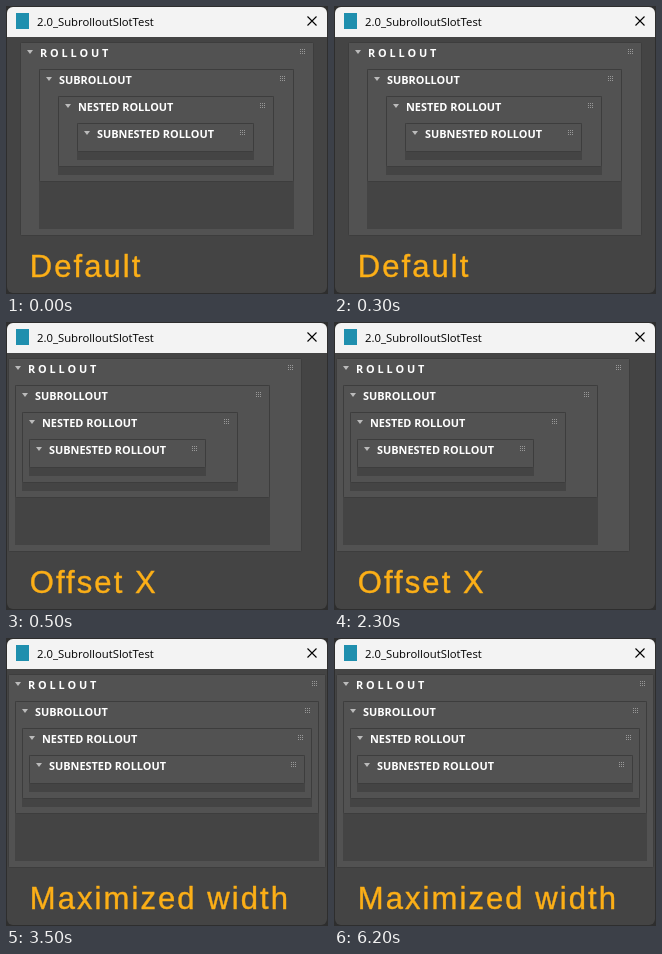
Recreate the animation shown at these times as an HTML page. Size 322 by 288 pixels, loop 8 s.

```html
<!DOCTYPE html>
<html lang="en">
<head>
<meta charset="utf-8">
<title>Rollout layout</title>
<style>
  html, body { margin: 0; width: 100%; height: 100%; overflow: hidden; background: #444; }
  svg { display: block; width: 322px; height: 288px; }
  .title { font: 11.3px "Open Sans", sans-serif; fill: #000; }
  .label { font: bold 10.9px "Open Sans", sans-serif; fill: #fff; white-space: pre; }
  .caption {
    font: 31px "Liberation Sans", Arial, sans-serif; letter-spacing: 2.07px;
    fill: #fcaf17; stroke: #fcaf17; stroke-width: .4px;
  }
</style>
</head>
<body>
<svg viewBox="0 0 322 288">
  <rect width="322" height="288" fill="#2e2e2e"/>
  <rect x="1" y="1" width="320" height="286" rx="6" fill="#444"/>
  <path d="M1 31V7a6 6 0 0 1 6-6H315a6 6 0 0 1 6 6V31Z" fill="#f3f3f3"/>
  <rect x="10" y="7" width="13" height="16" fill="#1f8fae"/>
  <text class="title" x="31" y="19.5">2.0_SubrolloutSlotTest</text>
  <path d="M301.5 10.5l9 9m0-9l-9 9" stroke="#000" stroke-width="1.1"/>
  <g id="rollouts"></g>
  <text id="caption" class="caption" x="23.8" y="271.3"></text>
</svg>
<script>
const LOOP = 8000;
const rollouts = [
  { label: "R O L L O U T", top: 36, bottom: 230, slot: 230 },
  { label: "SUBROLLOUT", top: 63, bottom: 176, slot: 223 },
  { label: "NESTED ROLLOUT", top: 90, bottom: 161, slot: 169 },
  { label: "SUBNESTED ROLLOUT", top: 117, bottom: 146, slot: 154 },
];

// Each nesting level moves the edges inwards by insetLeft and insetRight.
const states = [
  { start: 0, caption: "Default", left: 14, insetLeft: 19, right: 308, insetRight: 20 },
  { start: 500, caption: "Offset X", left: 2, insetLeft: 7, right: 296, insetRight: 32 },
  { start: 3500, caption: "Maximized width", left: 2, insetLeft: 7, right: 320, insetRight: 7 },
];

function dragDots(x, y) {
  let path = "";
  for (let row = 0; row < 3; row++)
    for (let col = 0; col < 3; col++) path += `M${x + col * 2} ${y + row * 2}h1v1h-1z`;
  return `<path d="${path}" fill="#999"/>`;
}

function rolloutMarkup({ label, top, bottom, slot }, left, right) {
  const width = right - left;
  return `
    <rect x="${left}" y="${top}" width="${width}" height="${slot - top}" fill="#444"/>
    <rect x="${left + .5}" y="${top + .5}" width="${width - 1}" height="${bottom - top - 1}"
      rx="1" fill="#525252" stroke="#3d3d3d"/>
    <path d="M${left + 7} ${top + 8}h6l-3 4z" fill="#bbb"/>
    <text class="label" x="${left + 20}" y="${top + 15}">${label}</text>
    ${dragDots(right - 14, top + 7)}`;
}

let current;
function show(state) {
  if (state === current) return;
  current = state;
  const { left, insetLeft, right, insetRight, caption } = state;
  document.getElementById("rollouts").innerHTML = rollouts.map((rollout, depth) =>
    rolloutMarkup(rollout, left + depth * insetLeft, right - depth * insetRight)).join("");
  document.getElementById("caption").textContent = caption;
}

function frame(now) {
  const time = now % LOOP;
  show(states.findLast(state => time >= state.start));
  requestAnimationFrame(frame);
}
show(states[0]);
requestAnimationFrame(frame);
</script>
</body>
</html>
```
